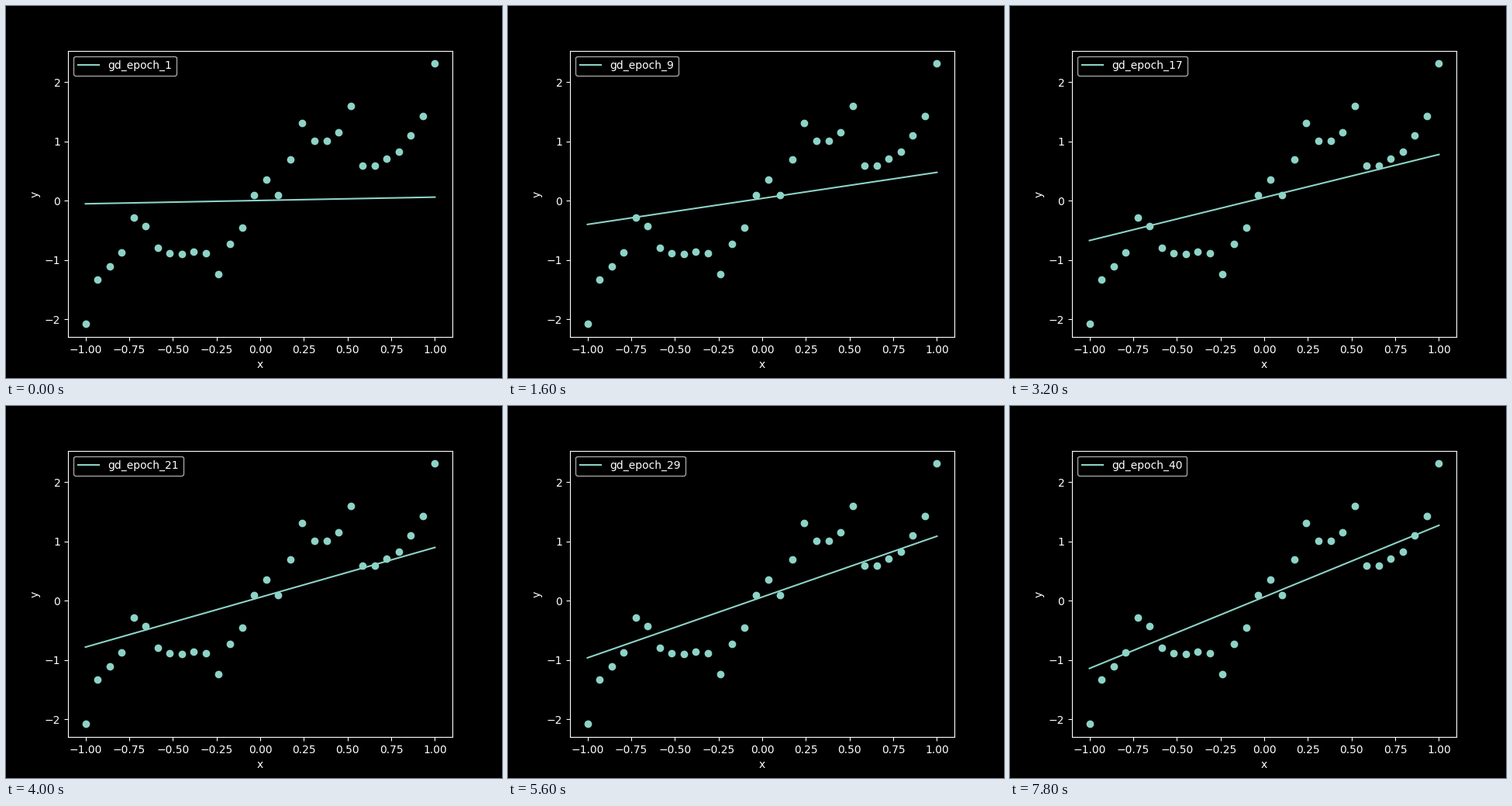
Animation of 640 by 480 pixels, one loop 8 s. Source, as a matplotlib script:

```python
import numpy as np
import matplotlib.pyplot as plt
from matplotlib.animation import FuncAnimation

EPOCHS = 40
STEP_MS = 200
RATE = 0.05

plt.style.use("dark_background")

x = np.linspace(-1, 1, 30)
y = np.array([
    -2.078, -1.33, -1.11, -0.875, -0.285, -0.43, -0.795, -0.885, -0.90, -0.86,
    -0.885, -1.24, -0.72, -0.455, 0.095, 0.355, 0.095, 0.695, 1.31, 1.01,
    1.01, 1.15, 1.595, 0.60, 0.59, 0.705, 0.825, 1.11, 1.425, 2.314,
])


def descend(epochs):
    """Fit y = w * x + b by gradient descent on the mean squared error."""
    w = b = 0.0
    fits = []
    for _ in range(epochs):
        err = w * x + b - y
        w, b = w - RATE * 2 * np.mean(err * x), b - RATE * 2 * np.mean(err)
        fits.append((w, b))
    return fits


fits = descend(EPOCHS)

fig, ax = plt.subplots(figsize=(6.4, 4.8), dpi=100)
ax.scatter(x, y)
line, = ax.plot(x, fits[0][0] * x + fits[0][1], label="gd_epoch_1")
ax.set_xlabel("x")
ax.set_ylabel("y")
legend = ax.legend(loc="upper left")
label = legend.get_texts()[0]


def update(i):
    w, b = fits[i]
    line.set_ydata(w * x + b)
    label.set_text(f"gd_epoch_{i + 1}")
    return line, legend


anim = FuncAnimation(fig, update, frames=EPOCHS, interval=STEP_MS,
                     init_func=lambda: update(0), repeat=True, repeat_delay=0)
plt.show()
```
